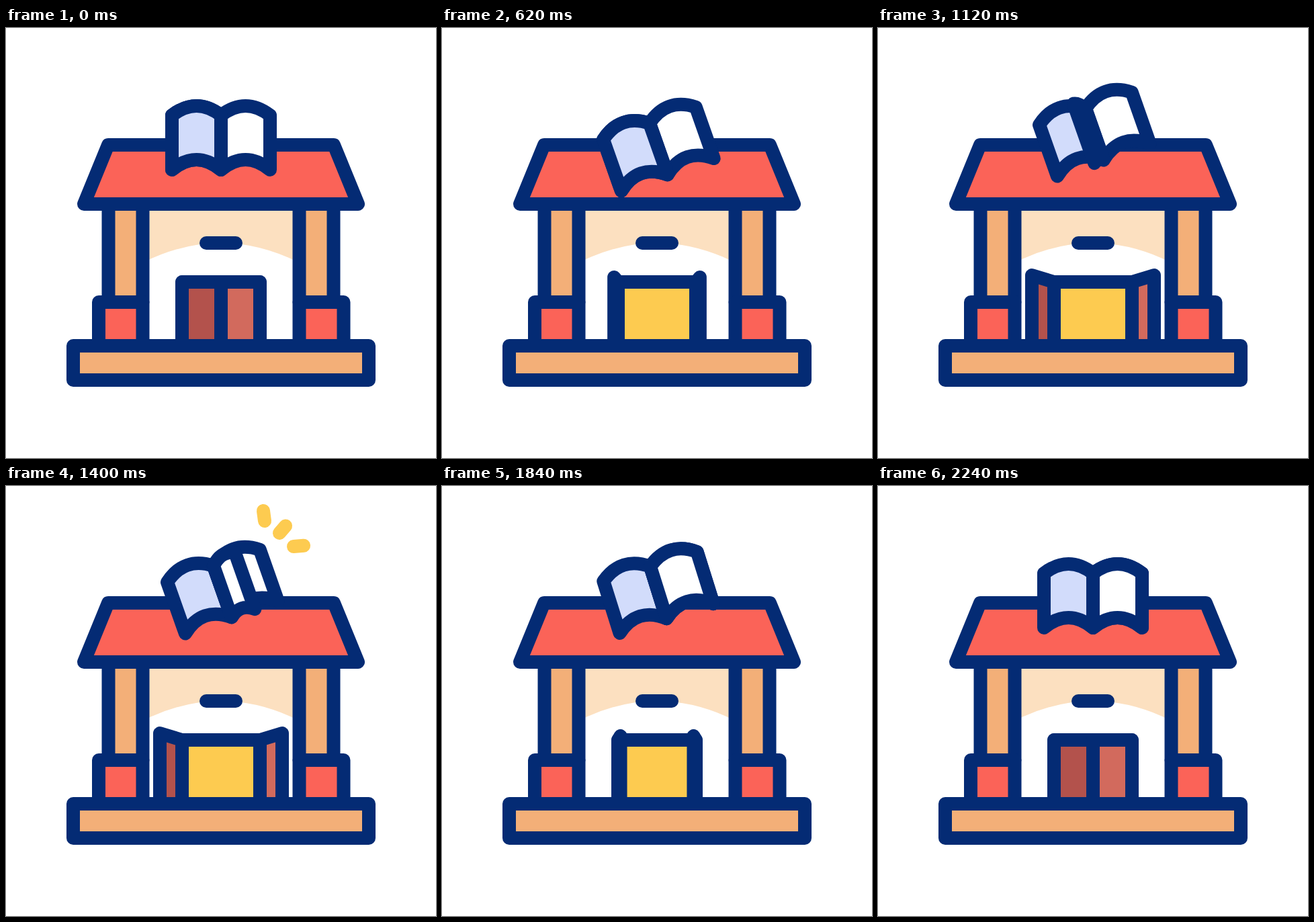
These frames come from a looping animation (640x640 px, 2400 ms). An HTML page:

```html
<!DOCTYPE html>
<html lang="en">
<head>
<meta charset="utf-8">
<title>Bookshop</title>
<style>
  html, body { margin: 0; width: 100%; height: 100%; overflow: hidden; background: #fff; }
  svg { display: block; width: 100vw; height: 100vh; }
  .ink { stroke: #042b74; stroke-width: 20; stroke-linecap: round; stroke-linejoin: round; fill: none; }
  .ink .tan { fill: #f3af78; }
  .ink .red { fill: #fb6358; }
  .ink .blue { fill: #d2dcfb; }
  .ink .white { fill: #fff; }
  #sparks { stroke: #fdcb50; stroke-width: 20; stroke-linecap: round; }
</style>
</head>
<body>
<svg viewBox="0 0 640 640">
  <path fill="#fce0c0" d="M204 262H436V349Q320 291 204 349Z"/>
  <g class="ink">
    <path d="M298 320H342"/>
    <path class="tan" d="M152.500 262H203.500V408H152.500ZM436.500 262H487.500V408H436.500Z"/>
    <path class="red" d="M138 408H203.500V473H138ZM436.500 408H502.500V473H436.500Z"/>
    <path fill="#fdcb50" d="M262 378H378V473H262Z"/>
    <path id="doorL" fill="#b3524c"/>
    <path id="doorR" fill="#d26a5d"/>
    <path class="tan" d="M100 473H540V524H100Z"/>
    <path class="red" d="M152 174H488L524 262H116Z"/>
    <g id="book">
      <path id="left" class="blue"/>
      <path id="right" class="white"/>
      <path id="leaf"/>
    </g>
  </g>
  <g id="sparks"></g>
</svg>
<script>
const LOOP = 2400;
const $ = id => document.getElementById(id);

// Linear progress from 0 to 1 between two times
const ramp = (t, from, to) => Math.min(1, Math.max(0, (t - from) / (to - from)));

// Page between the spine and a free edge at x
function page(x, lift = 0) {
  const mid = (320 + x) / 2;
  const bulge = 28 * Math.abs(320 - x) / 73;
  const top = 130 - lift;
  return `M320 130Q${mid} ${130 - lift / 2 - bulge} ${x} ${top}V211Q${mid} ${211 - bulge * 1.07} 320 211Z`;
}

const door = (hinge, x, y) => `M${hinge} 378L${x} ${y}V473H${hinge}Z`;

// Outer end, then the vector back towards the book
const sparks = [[381, 22, 4, 30], [425, 49, -18, 21], [458, 87.5, -30, 2.5]].map(ray => {
  const line = document.createElementNS('http://www.w3.org/2000/svg', 'path');
  $('sparks').append(line);
  return { line, ray };
});

$('left').setAttribute('d', page(247));
$('right').setAttribute('d', page(393));

function draw(t) {
  const open = ramp(t, 200, 800) - ramp(t, 1600, 2200);
  const swing = 91 * open, top = 378 - 10 * open;
  $('doorL').setAttribute('d', door(262, 320 - swing, top));
  $('doorR').setAttribute('d', door(378, 320 + swing, top));

  const back = ramp(t, 1800, 2200);
  const tilt = -19.4 * (ramp(t, 200, 600) - back);
  const y = 10 * ramp(t, 200, 600) - 23 * ramp(t, 715, 1140) + 13 * back;
  $('book').setAttribute('transform', `translate(0 ${y}) rotate(${tilt} 320 163.5)`);

  const flip = ramp(t, 800, 1600);
  $('leaf').setAttribute('d', page(247 + 146 * flip, 16 * (1 - Math.abs(1 - 2 * flip))));
  $('leaf').setAttribute('class', flip < 0.5 ? 'blue' : 'white');

  const head = 1 - ramp(t, 1200, 1600), tail = 1 - ramp(t, 1500, 1820);
  for (const { line, ray: [x, y, dx, dy] } of sparks) {
    line.setAttribute('d', tail > head
      ? `M${x + dx * tail} ${y + dy * tail}L${x + dx * head} ${y + dy * head}` : '');
  }
}

function tick() {
  draw(performance.now() % LOOP);
  requestAnimationFrame(tick);
}
tick();
</script>
</body>
</html>
```
